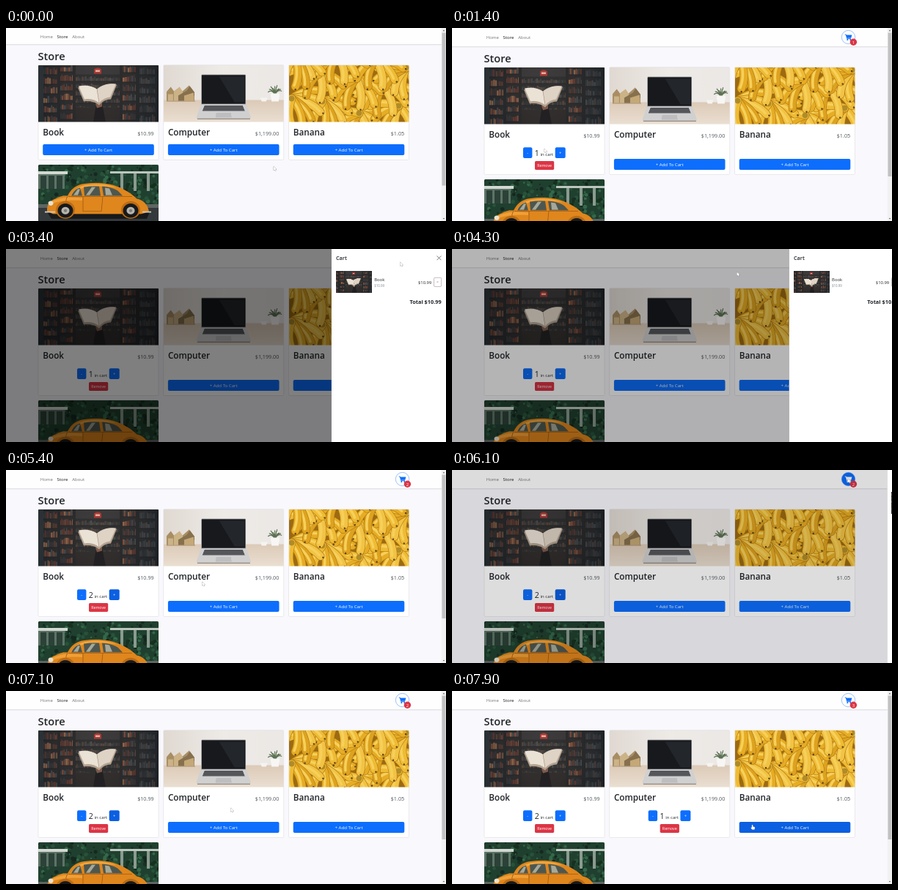
An HTML page with a canvas that plays this animation: 600x264 px, repeating every 8000 ms.

```html
<!DOCTYPE html>
<html lang="en">
<head>
<meta charset="utf-8">
<title>Store</title>
<style>
  html, body { margin: 0; width: 100%; height: 100%; overflow: hidden; background: #f9f8fc; }
  canvas { display: block; width: 600px; height: 264px; }
</style>
</head>
<body>
<canvas id="stage"></canvas>
<script>
const W = 600, H = 264, LOOP = 8000;
const IMG_W = 164, IMG_H = 78;
const BLUE = '#0d6efd', RED = '#dc3545', INK = '#212529';
const canvas = document.getElementById('stage');
const dpr = window.devicePixelRatio || 1;
canvas.width = W * dpr;
canvas.height = H * dpr;
const ctx = canvas.getContext('2d');

const clamp = v => Math.max(0, Math.min(1, v));
const ramp = (t, start, length) => clamp((t - start) / length);
const ease = p => (1 - Math.cos(Math.PI * p)) / 2;

function seeded(seed) {
  return () => (seed = (seed * 16807) % 2147483647) / 2147483647;
}

function rect(c, x, y, w, h, fill) {
  c.fillStyle = fill;
  c.fillRect(x, y, w, h);
}

function shape(c, fill, d) {
  c.fillStyle = fill;
  c.fill(new Path2D(d));
}

function line(c, color, width, d) {
  c.strokeStyle = color;
  c.lineWidth = width;
  c.stroke(new Path2D(d));
}

function disc(c, x, y, r, fill) {
  c.fillStyle = fill;
  c.beginPath();
  c.arc(x, y, r, 0, 7);
  c.fill();
}

function box(x, y, w, h, r, fill, stroke) {
  ctx.beginPath();
  ctx.roundRect(x, y, w, h, r);
  if (fill) { ctx.fillStyle = fill; ctx.fill(); }
  if (stroke) { ctx.strokeStyle = stroke; ctx.lineWidth = 0.6; ctx.stroke(); }
}

function text(str, x, y, size, color = INK, weight = 400, align = 'left') {
  ctx.font = `${weight} ${size}px "Open Sans", "Noto Sans", sans-serif`;
  ctx.fillStyle = color;
  ctx.textAlign = align;
  ctx.fillText(str, x, y);
}

// ---- Pictures ----

function picture(draw) {
  const scale = 2 * dpr, c = document.createElement('canvas');
  c.width = IMG_W * scale;
  c.height = IMG_H * scale;
  const g = c.getContext('2d');
  g.scale(scale, scale);
  draw(g);
  return c;
}

function drawLibrary(c) {
  const rnd = seeded(41);
  rect(c, 0, 0, IMG_W, IMG_H, '#24292d');
  const warm = ['#5f3a30', '#8f5540', '#3a3436', '#a87350', '#4a5156', '#6d3a30', '#343a3f'];
  const cool = ['#363c41', '#41464a', '#2d3236', '#54453e', '#4a5054'];
  const shelf = (x0, x1, y, h, tones) => {
    for (let x = x0; x < x1;) {
      const w = 1 + rnd() * 1.8, tall = h * (0.5 + rnd() * 0.35);
      rect(c, x, y + h - tall, w, tall - 1, tones[Math.floor(rnd() * tones.length)]);
      x += w + 0.4;
    }
    rect(c, x0, y + h - 1, x1 - x0, 1, '#191c1f');
  };
  for (let y = 1; y < 78; y += 13) {
    shelf(7, 26, y, 13, warm);
    shelf(30, 47, y - 3, 12, warm);
    shelf(115, 133, y - 2, 12, warm);
    shelf(138, 159, y, 13, cool);
  }
  for (let y = 14; y < 60; y += 10) shelf(51, 111, y, 9, cool);
  rect(c, 0, 0, 7, IMG_H, '#30393d');
  [[26, 4], [47, 4], [111, 4], [133, 5], [160, 4]].forEach(([x, w]) => rect(c, x, 0, w, IMG_H, '#202529'));
  rect(c, 51, 0, 60, 13, '#33363a');
  rect(c, 51, 58, 60, 20, '#282829');
  const glow = c.createRadialGradient(81, 30, 4, 81, 30, 95);
  glow.addColorStop(0, 'rgba(110,85,70,.2)');
  glow.addColorStop(1, 'rgba(18,24,30,.4)');
  rect(c, 0, 0, IMG_W, IMG_H, glow);
  shape(c, '#a93a36', 'M76 6Q81 2 86 6V12H76Z');
  rect(c, 78, 7, 6, 2.5, '#e8b0a0');
  shape(c, '#222022', 'M75 78L79 53L87 52L92 78Z');
  shape(c, '#7d5a4b', 'M78 53L87 50V57L80 59Z');
  shape(c, '#b3a290', 'M54 31Q66 28 79 34Q92 26 107 27L99 47Q90 47 83 55Q74 48 62 50Z');
  shape(c, '#ebe2d6', 'M55 29Q69 26 80 33L83 52Q74 45 63 47Z');
  shape(c, '#dfd3c5', 'M80 33Q91 24 106 26L98 44Q89 45 83 52Z');
  line(c, '#a08d7b', 0.6, 'M80 33L83 52');
}

function drawDesk(c) {
  const wall = c.createLinearGradient(0, 0, IMG_W, 0);
  wall.addColorStop(0, '#e0d9d2');
  wall.addColorStop(0.5, '#eeebe7');
  wall.addColorStop(1, '#ebe8e5');
  rect(c, 0, 0, IMG_W, IMG_H, wall);
  const wood = c.createLinearGradient(0, 48, 0, IMG_H);
  wood.addColorStop(0, '#dccab7');
  wood.addColorStop(1, '#eadfd2');
  rect(c, 0, 48, IMG_W, 30, wood);
  shape(c, '#a98e64', 'M4 49V37L10 30L15 37V49Z M26 49V36L35 28L42 37V49Z');
  shape(c, '#cbb287', 'M14 49V36L22 30L26 36V49Z M6 49V40H13V49Z');
  shape(c, '#86704d', 'M20 49V42L32 35L36 29L42 37V42L30 49Z');
  shape(c, '#c4a877', 'M28 49V42L41 38V49Z');
  rect(c, 4, 49, 39, 1.2, '#b39c80');
  shape(c, '#a5a5a7', 'M51.5 15Q51.5 13 53.5 13H110.5Q112.5 13 112.5 15V54H51.5Z');
  rect(c, 52.3, 13.8, 59.4, 39.4, '#17191d');
  shape(c, '#23262b', 'M76 16H110V51H97Z');
  shape(c, '#d0d0d1', 'M51 54H113L119 71Q119 74 116 74H48Q45 74 45 71Z');
  shape(c, '#55565a', 'M56 55.5H108L111 63H53Z');
  shape(c, '#bebec0', 'M72 65.5H92L93 72H71Z');
  rect(c, 46, 73.2, 72, 1.3, '#948b83');
  c.strokeStyle = '#5d7355';
  c.lineWidth = 1.2;
  for (let i = 0; i < 9; i++) {
    const a = Math.PI * (1.1 + i * 0.1);
    c.beginPath();
    c.moveTo(152, 41);
    c.quadraticCurveTo(152 + 4 * Math.cos(a), 33, 152 + 10 * Math.cos(a), 40 + (9 + i % 3 * 2) * Math.sin(a));
    c.stroke();
  }
  shape(c, '#f7f6f4', 'M146 39H158.5L157 50H147.5Z');
  shape(c, '#f5f3f0', 'M132 45H142L140 50H134Z');
}

function drawBananas(c) {
  const rnd = seeded(97);
  rect(c, 0, 0, IMG_W, IMG_H, '#9b6a12');
  c.lineCap = 'round';
  const yellows = ['#e6ac24', '#efbb34', '#f2c344', '#dda21f'];
  const curve = ([x0, y0, x1, y1, x2, y2], width, color) => {
    c.strokeStyle = color;
    c.lineWidth = width;
    c.beginPath();
    c.moveTo(x0, y0);
    c.quadraticCurveTo(x1, y1, x2, y2);
    c.stroke();
  };
  // Each bunch: stem position, first and last direction in turns.
  const bunches = [
    [96, 66, 0, 0.5], [150, 56, 0.1, 0.5], [46, 50, 0, 0.3], [128, 28, 0.02, 0.45],
    [4, 46, -0.05, 0.25], [92, 18, 0.08, 0.45], [160, 4, 0.2, 0.5],
    [42, 10, 0.08, 0.5], [118, -8, 0.05, 0.45], [66, -14, 0.05, 0.45], [8, -12, 0.03, 0.3]
  ];
  bunches.forEach(([x, y, from, to]) => {
    for (let i = 0; i < 6; i++) {
      const a = 2 * Math.PI * (from + (to - from) * i / 5), len = 36 + rnd() * 8;
      const bend = a < 1.57 ? -0.32 : 0.32;
      const pts = [x, y, x + len * 0.6 * Math.cos(a + bend), y + len * 0.6 * Math.sin(a + bend),
        x + len * Math.cos(a), y + len * Math.sin(a)];
      curve(pts, 11.5, '#ad7614');
      curve(pts, 10.3, yellows[i % 4]);
      curve(pts.map(v => v - 1.5), 3.5, '#f6d05a');
      disc(c, pts[4] + 4 * Math.cos(a), pts[5] + 4 * Math.sin(a), 1.2, '#57401a');
    }
    disc(c, x, y, 4, '#b08c28');
  });
}

function drawCar(c) {
  const rnd = seeded(23);
  rect(c, 0, 0, IMG_W, IMG_H, '#20402f');
  for (let i = 0; i < 240; i++) {
    disc(c, rnd() * IMG_W, rnd() * 58, 1 + rnd() * 2, ['#17301f', '#34684a', '#285239', '#142820'][i % 4]);
  }
  rect(c, 0, 9, 40, 4, '#d3d8d2');
  rect(c, 0, 13, 36, 20, '#5c7366');
  [3, 14, 25].forEach(x => rect(c, x, 15, 8, 18, '#2c4238'));
  rect(c, 98, 9, 66, 3, '#bcc6be');
  [112, 130, 148].forEach(x => rect(c, x, 12, 4, 24, '#8b9b90'));
  rect(c, 0, 54, IMG_W, 5, '#5e6663');
  rect(c, 0, 59, IMG_W, 19, '#34393b');

  c.translate(0, 3);
  c.scale(1, 0.92);
  shape(c, '#17191a', 'M12 67H152L148 77H18Z');
  shape(c, '#df861d', 'M12 66Q11 52 24 47Q32 42 40 43Q47 27 63 25Q90 21 110 30Q126 38 134 47Q149 51 151 67L140 70H20Z');
  shape(c, '#f3a83f', 'M44 43Q50 30 64 27Q90 23 107 31Q84 27 66 30Q54 32 49 43Z');
  shape(c, '#f0a038', 'M14 57Q17 48 40 45L60 46V50Q30 48 14 57Z');
  shape(c, '#4d574f', 'M45 43Q49 33 57 31L60 43Z M63 43L62 30Q74 28 83 29L85 43Z M89 43L87 29Q101 30 109 36L115 43Z');
  shape(c, '#a6a999', 'M65 42L73 30H78L70 42Z M92 42L91 31L97 32L101 42Z M48 42L54 33L57 33L54 42Z');
  line(c, '#a05a12', 0.8, 'M41 44H128 M61 44V66H86L88 44 M40 44Q33 54 49 66');
  [37, 126].forEach(x => {
    disc(c, x, 64, 13, '#bb6c15');
    disc(c, x, 65, 10.5, '#17191b');
    disc(c, x, 65, 5.5, '#b7b6ae');
    disc(c, x, 65, 2.2, '#7d7d79');
  });
  disc(c, 17, 54, 3.5, '#e9e2cf');
  rect(c, 9, 66, 14, 2, '#c9c9c6');
  rect(c, 142, 66, 12, 2, '#c9c9c6');
}

const pictures = [drawLibrary, drawDesk, drawBananas, drawCar].map(picture);

// ---- Timeline ----

const ADD_BOOK = 1290, SECOND_BOOK = 5080, ADD_COMPUTER = 7420;
const drawerSpans = [[2840, 4238], [6060, 6710]];
const path = [
  [0, 365, 189.5], [900, 126, 165], [1750, 126, 165], [2400, 525.8, 18], [2620, 540, 12],
  [3320, 540, 12], [3400, 537.5, 18], [4200, 388.5, 31.5], [4320, 388.5, 31.5], [4980, 147, 169],
  [5130, 147, 169], [5400, 267.5, 153], [5800, 540, 12], [6360, 540, 12], [6660, 345.8, 44],
  [6760, 345.8, 44], [7230, 298, 185], [7480, 298, 185], [7880, 409.5, 183], [8000, 409.5, 183]
];
const handSpans = [[840, ADD_BOOK], [2560, 2900], [4900, 5180], [5740, 6100], [7160, 7560], [7760, 8000]];
const within = (t, spans) => spans.some(([a, b]) => t >= a && t < b);
const hover = (t, a, b) => ramp(t, a, 150) * (1 - ramp(t, b, 150));

function mix(a, b, p) {
  return `rgb(${a.map((v, i) => Math.round(v + (b[i] - v) * p)).join()})`;
}
const blueFor = p => mix([13, 110, 253], [11, 95, 225], p);

function drawerState(t) {
  let slide = 0, shade = 0;
  for (const [open, close] of drawerSpans) {
    slide += ease(ramp(t, open, 300)) - ease(ramp(t, close, 300));
    shade += ramp(t, open, 150) - ramp(t, close, 150);
  }
  return { slide, shade };
}

// ---- Page ----

function drawNav(t, count) {
  const h = count ? 25 : 22, base = count ? 15 : 13.6;
  rect(ctx, 0, h, W, 0.8, 'rgba(0,0,0,.11)');
  rect(ctx, 0, h + 0.8, W, 1.2, 'rgba(0,0,0,.035)');
  rect(ctx, 0, 0, W, h, '#fefefe');
  text('Home', 46.8, base, 6, '#747474');
  text('Store', 69.6, base, 6, '#1a1a1a');
  text('About', 90.2, base, 6, '#747474');
  if (!count) return;

  const lit = Math.max(hover(t, 2560, 3300), hover(t, 5740, 6300));
  const ink = mix([13, 110, 253], [255, 255, 255], lit);
  disc(ctx, 540.5, 12.5, 9.2, `rgba(13,110,253,${lit})`);
  ctx.strokeStyle = '#5c9dfd';
  ctx.lineWidth = 0.6;
  ctx.stroke();
  line(ctx, ink, 0.9, 'M535.8 9H537.3L538.7 14.6H544');
  shape(ctx, ink, 'M537.4 9.4H545.4L544.2 13.8H538.4Z');
  disc(ctx, 539.3, 16, 1, ink);
  disc(ctx, 543.4, 16, 1, ink);
  disc(ctx, 547.4, 19.3, 4.7, RED);
  text(count, 547.4, 21.5, 5.9, '#fff', 400, 'center');
}

function drawCard(x, y, h, index, name, price, qty, lit, plusLit) {
  box(x, y, IMG_W, h, 1.6, '#fff', 'rgba(0,0,0,.13)');
  ctx.save();
  ctx.beginPath();
  ctx.roundRect(x, y, IMG_W, IMG_H, [1.6, 1.6, 0, 0]);
  ctx.clip();
  ctx.drawImage(pictures[index], x, y, IMG_W, IMG_H);
  ctx.restore();
  if (!name) return;
  text(name, x + 6.2, y + 96.6, 11.75, INK, 600);
  text(price, x + 157.6, y + 96.6, 7.2, '#50575c', 400, 'right');
  if (!qty) {
    const top = y + h - 21.5;
    box(x + 6.2, top, 151.6, 15, 2, blueFor(lit));
    text('+ Add To Cart', x + 82, top + 9.8, 6.1, '#fff', 400, 'center');
    return;
  }
  box(x + 53, y + 109.8, 12.4, 14.6, 2, BLUE);
  text('-', x + 59.2, y + 119, 5.9, '#fff', 400, 'center');
  text(qty, x + 71.8, y + 121.2, 10.6, INK, 400, 'center');
  text('in cart', x + 76.6, y + 121.2, 6);
  box(x + 96.7, y + 109.8, 14, 14.6, 2, blueFor(plusLit));
  text('+', x + 103.7, y + 119.3, 5.9, '#fff', 400, 'center');
  box(x + 69, y + 128.4, 26.2, 12, 1.6, RED);
  text('Remove', x + 82.1, y + 136.4, 5.3, '#fff', 400, 'center');
}

function drawScrollbar(count) {
  rect(ctx, 593.8, 0, 6.2, H, '#f1f1f1');
  rect(ctx, 594.5, 6.5, 5, count ? 196.5 : 209, '#c1c1c1');
  shape(ctx, '#606060', 'M595.7 4.2L597 2.6L598.3 4.2Z M595.7 260L597 261.6L598.3 260Z');
}

function drawDrawer(slide, books) {
  const total = books > 1 ? '$21.98' : '$10.99';
  ctx.save();
  ctx.translate(156.2 * (1 - slide), 0);
  rect(ctx, 443.8, 0, 157, H, '#fff');
  rect(ctx, 443.6, 0, 0.4, H, 'rgba(0,0,0,.25)');
  text('Cart', 450, 15.3, 7.3, INK, 600);
  line(ctx, '#777', 1, 'M587.6 9.4L593.4 15.2M593.4 9.4L587.6 15.2');
  const s = pictures[0].width / IMG_W;
  ctx.drawImage(pictures[0], 17 * s, 0, 130 * s, IMG_H * s, 450, 30.3, 49, 29.3);
  text('Book', 502.2, 44.2, 5.9);
  if (books > 1) text('x2', 518, 44.2, 3.8, '#888');
  text('$10.99', 502.2, 51.6, 4.4, '#7d848a');
  text(total, 580.3, 47.6, 5.9, INK, 400, 'right');
  box(583.6, 39.2, 10, 12.2, 1.3, null, '#a08f92');
  text('×', 588.6, 47.2, 5.2, '#a08f92', 400, 'center');
  text('Total ' + total, 593.8, 74.7, 7.4, INK, 700, 'right');
  ctx.restore();
}

function drawCursor(t) {
  let i = 0;
  while (i < path.length - 2 && t >= path[i + 1][0]) i++;
  const [t0, x0, y0] = path[i], [t1, x1, y1] = path[i + 1];
  const p = ease(ramp(t, t0, t1 - t0));
  ctx.save();
  ctx.translate(x0 + (x1 - x0) * p, y0 + (y1 - y0) * p);
  const outline = new Path2D(within(t, handSpans)
    ? 'M-.6 .4Q.2 -.4 .8 .4V2.4L3 3Q3.6 3.2 3.4 4.4L3 6.4H-.4L-2 4Q-1.6 3.2 -.6 4Z'
    : 'M0 0V5.2L1.3 4.1L2.2 6L3.1 5.6L2.3 3.8H3.9Z');
  ctx.fillStyle = '#fff';
  ctx.strokeStyle = '#666';
  ctx.lineWidth = 0.5;
  ctx.stroke(outline);
  ctx.fill(outline);
  ctx.restore();
}

function render(t) {
  const books = t < ADD_BOOK ? 0 : t < SECOND_BOOK ? 1 : 2;
  const computers = t < ADD_COMPUTER ? 0 : 1;
  const count = books + computers;
  const top = count ? 53.5 : 50.5, height = count ? 147 : 130;
  const { slide, shade } = drawerState(t);

  ctx.setTransform(dpr, 0, 0, dpr, 0, 0);
  rect(ctx, 0, 0, W, H, '#f9f8fc');
  drawNav(t, count);
  text('Store', 43.6, top - 7, 14.6, INK, 600);
  drawCard(44, top, height, 0, 'Book', '$10.99', books, hover(t, 840, ADD_BOOK), hover(t, 4900, 7400));
  drawCard(214.7, top, height, 1, 'Computer', '$1,199.00', computers, hover(t, 7160, 7500), 0);
  drawCard(385.5, top, height, 2, 'Banana', '$1.05', 0, hover(t, 7740, 8200), 0);
  drawCard(44, top + height + 6.5, height, 3);
  if (slide <= 0) drawScrollbar(count);
  if (shade > 0) rect(ctx, 0, 0, W, H, `rgba(0,0,0,${shade / 2})`);
  if (slide > 0) drawDrawer(slide, books);
  drawCursor(t);
}

let start;
function tick(now) {
  if (start === undefined) start = now;
  render((now - start) % LOOP);
  requestAnimationFrame(tick);
}
requestAnimationFrame(tick);
</script>
</body>
</html>
```
